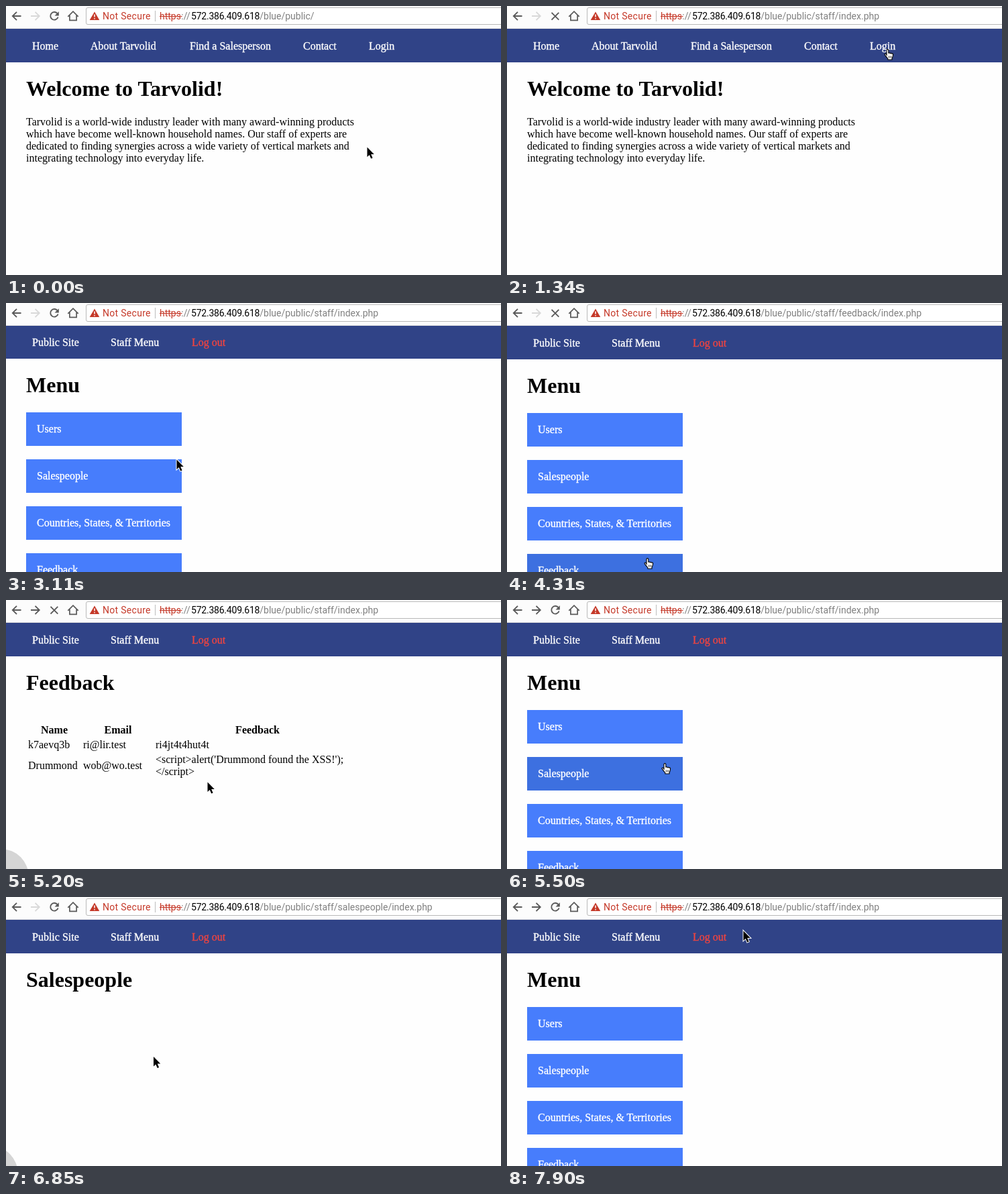
Write an HTML page that moves like this. It is 738 px wide and 401 px high and loops after 8 s.

```html
<!DOCTYPE html>
<html lang="en">
<head>
<meta charset="utf-8">
<title>Staff site tour</title>
<style>
  html, body { margin: 0; width: 100%; height: 100%; overflow: hidden; background: #fefefe; }
  svg { display: block; width: 738px; height: 401px; }
  text { white-space: pre; }
  .page { font: 16px "Liberation Serif", serif; }
  .page h1, .title { font-size: 32px; font-weight: bold; }
  .bold { font-weight: bold; text-anchor: middle; }
  .light { fill: #fff; stroke: #fff; stroke-width: .35px; }
  .logout { fill: #ef4440; stroke: #ef4440; }
  .button { fill: #477dfc; }
  .button.hover { fill: #3d70e0; }
  .bar { font: 14px Roboto, sans-serif; }
  .icon { fill: none; stroke: #5a5a5a; stroke-width: 1.9px; }
  .icon.off { stroke: #d9d9d9; }
  .alert { fill: #c53929; }
  .host { letter-spacing: -.22px; }
  .path { fill: #808080; }
  .hidden { display: none; }
</style>
</head>
<body>
<svg viewBox="0 0 738 401">
  <rect width="738" height="401" fill="#fefefe"/>

  <g id="view" class="page">
    <rect y="30" width="738" height="54" fill="#304387"/>

    <g data-nav="public" class="light">
      <text x="39" y="65">Home</text>
      <text x="126" y="65">About Tarvolid</text>
      <text x="274" y="65">Find a Salesperson</text>
      <text x="443" y="65">Contact</text>
      <text x="541" y="65">Login</text>
    </g>
    <g data-nav="staff" class="light">
      <text x="39" y="65">Public Site</text>
      <text x="156" y="65">Staff Menu</text>
      <text x="277" y="65" class="logout">Log out</text>
    </g>

    <g data-page="home">
      <text class="title" x="30" y="134">Welcome to Tarvolid!</text>
      <text x="30" y="178">Tarvolid is a world-wide industry leader with many award-winning products</text>
      <text x="30" y="196">which have become well-known household names. Our staff of experts are</text>
      <text x="30" y="214">dedicated to finding synergies across a wide variety of vertical markets and</text>
      <text x="30" y="232">integrating technology into everyday life.</text>
    </g>

    <g data-page="menu">
      <text class="title" x="30" y="134">Menu</text>
      <g id="buttons"></g>
    </g>

    <g data-page="feedback">
      <text class="title" x="30" y="134">Feedback</text>
      <text class="bold" x="72" y="199">Name</text>
      <text class="bold" x="167" y="199">Email</text>
      <text class="bold" x="375" y="199">Feedback</text>
      <text x="33" y="221">k7aevq3b</text>
      <text x="115" y="221">ri@lir.test</text>
      <text x="223" y="221">ri4jt4t4hut4t</text>
      <text x="33" y="252">Drummond</text>
      <text x="115" y="252">wob@wo.test</text>
      <text x="223" y="243">&lt;script&gt;alert('Drummond found the XSS!');</text>
      <text x="223" y="261">&lt;/script&gt;</text>
    </g>

    <g data-page="salespeople">
      <text class="title" x="30" y="134">Salespeople</text>
    </g>
  </g>

  <circle id="swipe" cy="411" r="39.4" fill="#d5d5d5"/>

  <g class="bar">
    <rect width="738" height="34" fill="#fcfcfc"/>
    <rect y="33" width="738" height="1" fill="#dedede"/>
    <path class="icon" d="M22.5 15H10M16 8.8L9.8 15l6.2 6.2"/>
    <path class="icon" id="forward" d="M37 15h12.5M43.5 8.8l6.2 6.2-6.2 6.2"/>
    <g id="reload">
      <path class="icon" d="M76.4 11A5.8 5.8 0 1 0 77.6 16.5"/>
      <path d="M78.8 8.2v6.3h-6.3z" fill="#5a5a5a"/>
    </g>
    <path class="icon" id="stop" d="M66.5 9.8l10.8 10.8M77.3 9.8L66.5 20.6"/>
    <path class="icon" d="M92.3 15.8L100 8.2l7.7 7.6M94.9 14v7.3h10.2V14" style="stroke-width:1.7px"/>

    <rect x="119.5" y="2.5" width="640" height="25" rx="2.5" fill="#fff" stroke="#b9b9b9"/>
    <path class="alert" d="M132 8.5L139.3 21h-14.6z"/>
    <path d="M132 12.6v4M132 18v1.6" stroke="#fff" stroke-width="1.5"/>
    <text class="alert" x="144" y="20" letter-spacing=".3">Not Secure</text>
    <path d="M222.5 7v16" stroke="#bdbdbd"/>
    <text class="alert" x="229" y="20">https</text>
    <path d="M229 15.5h33.5" stroke="#c53929" stroke-width="1.2"/>
    <text class="path" x="261.3" y="20">://</text>
    <text class="host" x="276" y="20">572.386.409.618</text>
    <text class="path" id="path" x="378.3" y="20"></text>
  </g>

  <g id="arrow">
    <path d="M0 0V14.5l3.3-3.1 2.4 5.5 2.4-1-2.4-5.4h4.6z" stroke="#fff" stroke-width="2" paint-order="stroke"/>
  </g>
  <g id="hand">
    <path d="M4 9V2a1.4 1.4 0 0 1 2.8 0v4.5c.3-1 2.3-.9 2.5.2.5-.8 2.1-.6 2.3.5.6-.6 2-.3 2 .9 0 3-.3 4-1.6 6V16H5.8v-1.5C4.5 13 2.5 10.5 1.2 8.6.6 7.4 2 6.4 3 7.4z"
          fill="#fff" stroke="#000" stroke-width="1.1"/>
    <path d="M7.1 10.5v3M9 10.5v3M10.9 10.5v3" stroke="#000" stroke-width=".7"/>
  </g>
</svg>

<script>
  const LOOP = 8000;
  const $ = id => document.getElementById(id);
  const show = (el, on) => el.classList.toggle("hidden", !on);

  const labels = ["Users", "Salespeople", "Countries, States, & Territories", "Feedback"];
  $("buttons").innerHTML = labels.map((label, i) => `
    <rect class="button" x="30" y="${164 + 70 * i}" width="232" height="50"/>
    <text class="light" x="46" y="${194 + 70 * i}">${label.replace("&", "&amp;")}</text>`).join("");
  const buttons = document.querySelectorAll(".button");

  // Each step changes only what it names; the rest carries over.
  const steps = [
    [0, { page: "home", path: "", loading: false, forward: false, hover: -1, scroll: 0, swipe: -60 }],
    [1040, { path: "staff/index.php", loading: true }],
    [1780, { page: "menu" }],
    [2220, { loading: false }],
    [2960, { scroll: -1 }],
    [3250, { scroll: 0, hover: 1 }],
    [3400, { hover: 2 }],
    [3550, { hover: 3 }],
    [4160, { path: "staff/feedback/index.php", loading: true }],
    [4450, { page: "feedback", loading: false, hover: -1 }],
    [5050, { swipe: -22 }],
    [5200, { swipe: -6, path: "staff/index.php", loading: true, forward: true }],
    [5350, { swipe: -60, page: "menu" }],
    [5500, { loading: false, hover: 1 }],
    [6100, { path: "staff/salespeople/index.php", loading: true, forward: false }],
    [6400, { page: "salespeople", loading: false, hover: -1 }],
    [6850, { swipe: -22 }],
    [7000, { swipe: -6, path: "staff/index.php", loading: true, forward: true }],
    [7150, { swipe: -60, page: "menu" }],
    [7300, { loading: false }]
  ];

  // time, x, y, hand
  const moves = [
    [0, 538.5, 210.5, 0], [150, 549, 150, 0], [290, 560, 53, 1], [440, 562, 64, 1],
    [2220, 565, 66, 0], [2370, 510, 110, 0], [2520, 420, 180, 0], [2660, 330, 225, 0],
    [2810, 270, 234, 0], [2960, 254.5, 233.5, 0], [3250, 238, 262, 1], [3400, 222, 318, 1],
    [3550, 208, 376, 1], [3710, 204, 380, 1], [4450, 204, 380, 0], [4600, 300.5, 271.5, 0],
    [5500, 230, 243, 1], [5650, 215, 237, 1], [6400, 220, 238, 0], [7300, 250, 190, 0],
    [7450, 282, 156, 0], [7750, 322, 95, 0], [7900, 352.5, 50.5, 0]
  ];

  function draw(now) {
    const t = now % LOOP;
    const s = Object.assign({}, ...steps.filter(([at]) => at <= t).map(([, change]) => change));
    const [, x, y, hand] = moves.filter(([at]) => at <= t).pop();
    const nav = s.page === "home" ? "public" : "staff";

    document.querySelectorAll("[data-page]").forEach(el => show(el, el.dataset.page === s.page));
    document.querySelectorAll("[data-nav]").forEach(el => show(el, el.dataset.nav === nav));
    buttons.forEach((el, i) => el.classList.toggle("hover", i === s.hover));
    $("view").setAttribute("transform", `translate(0 ${s.scroll})`);
    $("swipe").setAttribute("cx", s.swipe);
    $("path").textContent = "/blue/public/" + s.path;
    $("forward").classList.toggle("off", !s.forward);
    show($("reload"), !s.loading);
    show($("stop"), s.loading);

    show($("arrow"), !hand);
    show($("hand"), hand);
    $(hand ? "hand" : "arrow").setAttribute("transform", `translate(${x} ${y})`);
    requestAnimationFrame(draw);
  }
  draw(0);
</script>
</body>
</html>
```
